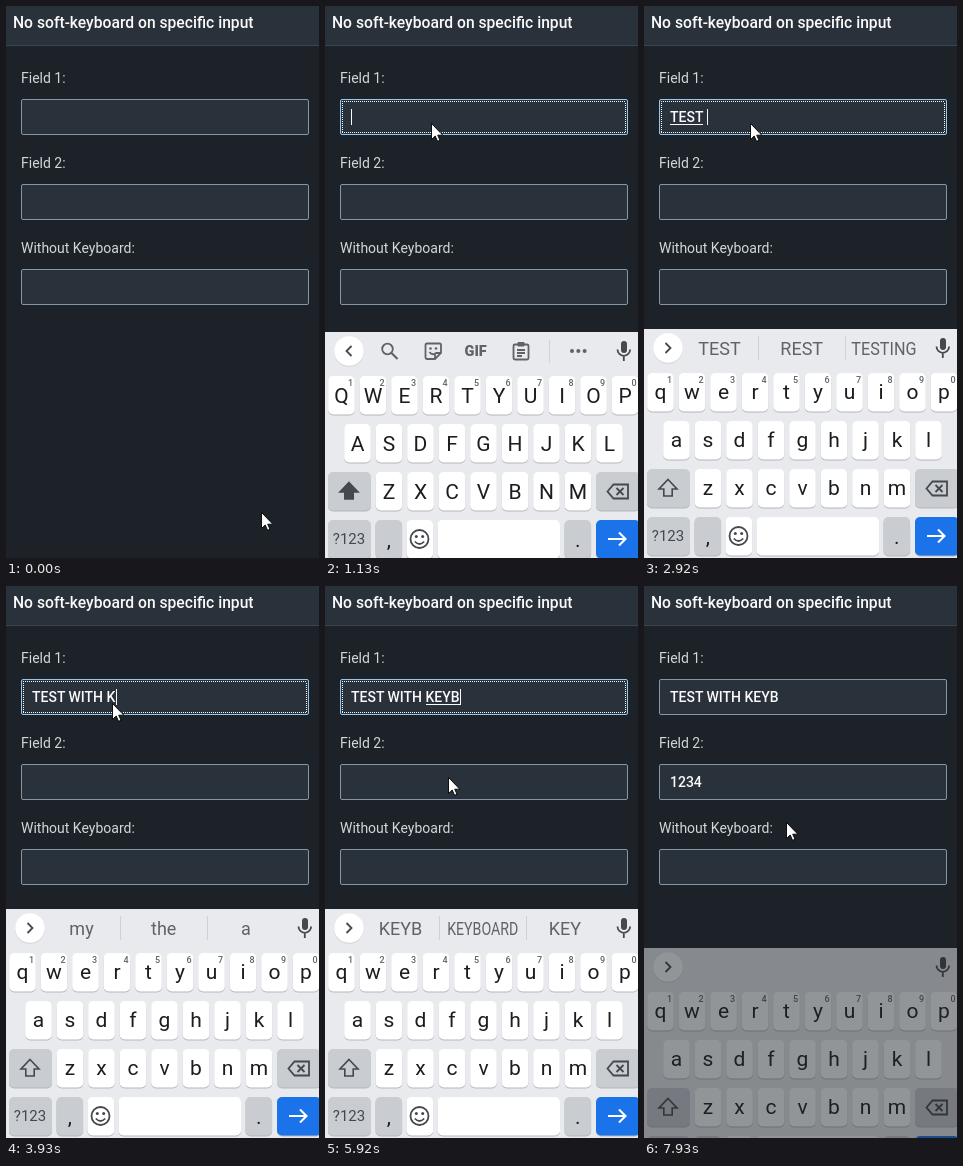
Recreate the animation shown at these times as an HTML page. Size 313 by 552 pixels, loop 8 s.

```html
<!DOCTYPE html>
<html lang="en">
<head>
<meta charset="utf-8">
<title>Soft keyboard demo</title>
<style>
html, body { margin: 0; width: 100%; height: 100%; overflow: hidden; background: #1c2228; }
svg { display: block; width: 313px; height: 552px; font-family: Roboto, sans-serif; }
text { white-space: pre; }
.mid { text-anchor: middle; }
.bold { font-weight: 500; }
.line { fill: none; stroke-width: 1.8; }
.thick { stroke-width: 2.1; }
</style>
</head>
<body>
<svg id="stage" viewBox="0 0 313 552"></svg>
<script>
const LOOP = 8000, FOCUS1 = 900, FOCUS2 = 6080, BLUR = 7700;
const INK = '#1c1d20', GREY = '#5f6368', SLATE = '#45484c', SHADE = '#c9ccd1', RULE = '#cfd1d5';
const stage = document.getElementById('stage');
const pen = document.createElement('canvas').getContext('2d');

// Field contents over time: committed|composing|tail
const edits = [
  [0, ''], [FOCUS1, ''], [1010, ''], [1830, '|T'], [2090, '|TE'], [2330, '|TES'], [2560, '|TEST'],
  [2920, '|TEST| '], [3150, 'TEST |W'], [3310, 'TEST |WI'], [3460, 'TEST |WIT'],
  [3610, 'TEST |WITH'], [3770, 'TEST WITH '], [3930, 'TEST WITH K'], [4010, 'TEST WITH |K'],
  [4180, 'TEST WITH |KE'], [4350, 'TEST WITH |KEY'], [4620, 'TEST WITH |KEYB'],
  [FOCUS2, ''], [6630, '1'], [6860, '12'], [7010, '123'], [7320, '1234']
];
// Suggestion strip over time; null shows the toolbar
const strips = [
  [0, null], [2090, 'TE THE TO'], [2330, 'TES TEST YES'], [2670, 'TEST REST TESTING'],
  [3150, 'W WITH WE'], [3310, 'WI WITH WILL'], [3460, 'WIT WITH WITS'], [3610, 'WITH WIT WIDTH'],
  [3850, 'my the a'], [4010, 'K KEEP KNOW'], [4180, 'KE KEY KEEP'], [4350, 'KEY KEYS KEEP'],
  [4700, 'KEYB KEYBOARD KEY'], [6150, null], [6860, '']
];
// Pointer moves: start, end, from, to
const moves = [
  [0, 350, 255, 506, 106, 117],
  [5690, 5920, 106, 117, 123, 191],
  [5920, 6060, 123, 191, 125, 196],
  [7400, 7700, 125, 196, 142, 236]
];

const clamp = v => Math.max(0, Math.min(1, v));
const ease = u => u * u * (3 - 2 * u);
const at = (list, t) => list.filter(e => e[0] <= t).pop();
// Progress from a to b, advancing in steps like a screen recording
const progress = (t, a, b, step = 76) => clamp(Math.floor((t - a) / step) * step / (b - a));

const rect = (x, y, w, h, fill, more = '') =>
  `<rect x="${x}" y="${y}" width="${w}" height="${h}" fill="${fill}" ${more}/>`;
const text = (x, y, size, fill, s, style = '') =>
  `<text x="${x}" y="${y}" font-size="${size}" fill="${fill}" class="${style}">${s}</text>`;
const mid = (x, y, size, fill, s, style = '') => text(x, y, size, fill, s, 'mid ' + style);
const line = (d, stroke = GREY, style = '') => `<path class="line ${style}" d="${d}" stroke="${stroke}"/>`;
const dot = (x, y, r, fill = GREY) => `<circle cx="${x}" cy="${y}" r="${r}" fill="${fill}"/>`;
const ring = (x, y, r, stroke = GREY) =>
  `<circle class="line" cx="${x}" cy="${y}" r="${r}" stroke="${stroke}"/>`;
const width = s => {
  pen.font = '500 14px Roboto, sans-serif';
  return pen.measureText(s).width;
};

function field(y, label, value, focused, caret) {
  const [done, word = '', tail = ''] = value.split('|');
  const x = 26 + width(done);
  let s = text(15, y - 16, 14, '#d3d7d9', label)
    + rect(15.5, y + .5, 287, 35, '#29313a', `rx="1.5" stroke="${focused ? '#91c8f6' : '#8696a9'}"`)
    + text(26, y + 23, 14, '#fafafa', done + word + tail, 'bold');
  if (!focused) return s;
  s += `<path d="M17 ${y + 2.5}h284M17 ${y + 33.5}h284M17.5 ${y + 4}v29M300.5 ${y + 4}v29" stroke="#fafafa" stroke-dasharray="1 1"/>`;
  if (word) s += rect(Math.round(x), y + 25, Math.round(width(word)), 1, '#fafafa');
  if (caret) s += rect(Math.round(26 + width(done + word + tail)), y + 10, 1, 16, '#fafafa');
  return s;
}

const key = (x, y, w, fill = '#fff') =>
  rect(x, y + 1, w, 38.5, '#b4b7bc', 'rx="5"') + rect(x, y, w, 38.5, fill, 'rx="5"');

function letters(chars, x0, y, upper, hints) {
  return [...chars].map((c, i) => {
    const x = x0 + i * 31.5;
    return key(x - 13.3, y, 26.6)
      + mid(x, y + (upper ? 27 : 26), 21, INK, upper ? c.toUpperCase() : c)
      + (hints ? mid(x + 9, y + 10, 9, GREY, (i + 1) % 10, 'bold') : '');
  }).join('');
}

function toolbar() {
  return ring(62.5, 340, 5.3) + line('M66.5 344l6 6', GREY, 'thick')
    + line('M102 334.5h12.5q1.5 0 1.5 1.5v8l-6 6h-8q-1.5 0-1.5-1.5v-12.5q0-1.5 1.5-1.5zM110 350v-4.5q0-1.5 1.5-1.5h4.5M104.5 343q2 3 5 2')
    + dot(105.5, 339.5, 1.3) + dot(111, 339.5, 1.3)
    + `<g font-weight="900">${text(139.5, 347, 14.5, GREY, 'GIF')}</g>`
    + line('M190 335.5h12q1.5 0 1.5 1.5v12q0 1.5-1.5 1.5h-12q-1.5 0-1.5-1.5v-12q0-1.5 1.5-1.5zM192 341h8M192 344h8M192 347h5')
    + rect(192.5, 333, 7, 4.5, GREY, 'rx="1"')
    + rect(224, 331, 1, 23, RULE)
    + dot(247, 342, 2) + dot(253.3, 342, 2) + dot(259.6, 342, 2);
}

function suggestions(words) {
  if (!words) return '';
  return rect(114, 330, 1, 24, RULE) + rect(201, 330, 1, 24, RULE)
    + words.split(' ').map((s, i) => {
      const squeeze = Math.min(1, 6.3 / s.length);
      return `<g transform="translate(${75.5 + i * 82.2} 349) scale(${squeeze} 1)">${mid(0, 0, 18, GREY, s)}</g>`;
    }).join('');
}

function keyboard(t) {
  const upper = t < 1830 || (t >= 6230 && t < 6630);
  const words = at(strips, t)[1], open = words === null;
  const opening = progress(t, 976, 1176), closing = progress(t, 7776, 7928);
  const y = Math.round(229 * (1 - opening) ** 3 + 39 * closing ** 2);
  return `<g transform="translate(0 ${y})" opacity="${1 - .48 * closing}">`
    + rect(0, 323, 313, 229, '#e8eaed')
    + dot(24, 342.8, 15, '#d2d4d8') + dot(24, 342, 14.8, '#fff')
    + line(open ? 'M26.5 337l-5 5 5 5' : 'M21.5 337l5 5-5 5', SLATE)
    + (open ? toolbar() : suggestions(words))
    + rect(296, 332, 6, 12, SLATE, 'rx="3"')
    + line('M292.5 340.5a6.3 6.3 0 0 0 12.6 0M298.8 347v5', SLATE)
    + letters('qwertyuiop', 16.5, 367, upper, true)
    + letters('asdfghjkl', 32.5, 415, upper)
    + key(3, 463, 43, SHADE) + letters('zxcvbnm', 64, 463, upper) + key(271, 463, 44, SHADE)
    + `<path d="M24 473.5l9 9.5h-4.800v7h-8.400v-7h-4.800z" fill="${upper ? SLATE : 'none'}" stroke="${SLATE}" stroke-width="1.6"/>`
    + line('M282.5 482.5l6-7h14.5v14h-14.5zM291.5 479l7 7M298.5 479l-7 7', SLATE)
    + key(3, 511, 43, SHADE) + mid(24, 535, 15, SLATE, '?123')
    + key(50.5, 511, 26.6, SHADE) + mid(63.8, 538, 21, INK, ',')
    + key(81.5, 511, 26.6) + ring(94.5, 530, 9, SLATE)
    + dot(91.3, 527.5, 1.5, SLATE) + dot(97.7, 527.5, 1.5, SLATE)
    + line('M89.8 532.5q4.7 5 9.4 0', SLATE)
    + key(112.5, 511, 122.5)
    + key(239.5, 511, 26.6, SHADE) + mid(252.8, 538, 21, INK, '.')
    + key(271, 511, 44, '#1a73e8')
    + line('M283 530h17M294 523.5l6.5 6.5-6.5 6.5', '#fff', 'thick')
    + '</g>';
}

function pointer(t) {
  const [a, b, x0, y0, x1, y1] = at(moves, t);
  const u = ease(progress(t, a, b, 70));
  const x = Math.round(x0 + (x1 - x0) * u), y = Math.round(y0 + (y1 - y0) * u);
  return `<path transform="translate(${x} ${y})" d="M.5 .5V16.5L4.2 13 6.600 18.3 9 17.3 6.7 12.2H11.8z" fill="#fff" stroke="#000" stroke-width=".9"/>`;
}

function scene(t) {
  const [since, value] = at(edits, t);
  const caret = (t - since) % 1000 < 500;
  const second = t >= FOCUS2;
  return rect(0, 0, 313, 552, '#1c2228')
    + rect(0, 0, 313, 40, '#29313a') + rect(0, 39, 313, 1, '#3a4552')
    + text(7, 22, 15.65, '#fafafa', 'No soft-keyboard on specific input', 'bold')
    + field(93, 'Field 1:', second ? 'TEST WITH KEYB' : value, t >= FOCUS1 && !second, caret)
    + field(178, 'Field 2:', second ? value : '', second && t < BLUR, caret)
    + field(263, 'Without Keyboard:', '', false, false)
    + keyboard(t) + pointer(t);
}

let shown = '';
function frame() {
  const next = scene(performance.now() % LOOP);
  if (next !== shown) stage.innerHTML = shown = next;
  requestAnimationFrame(frame);
}
frame();
</script>
</body>
</html>
```
